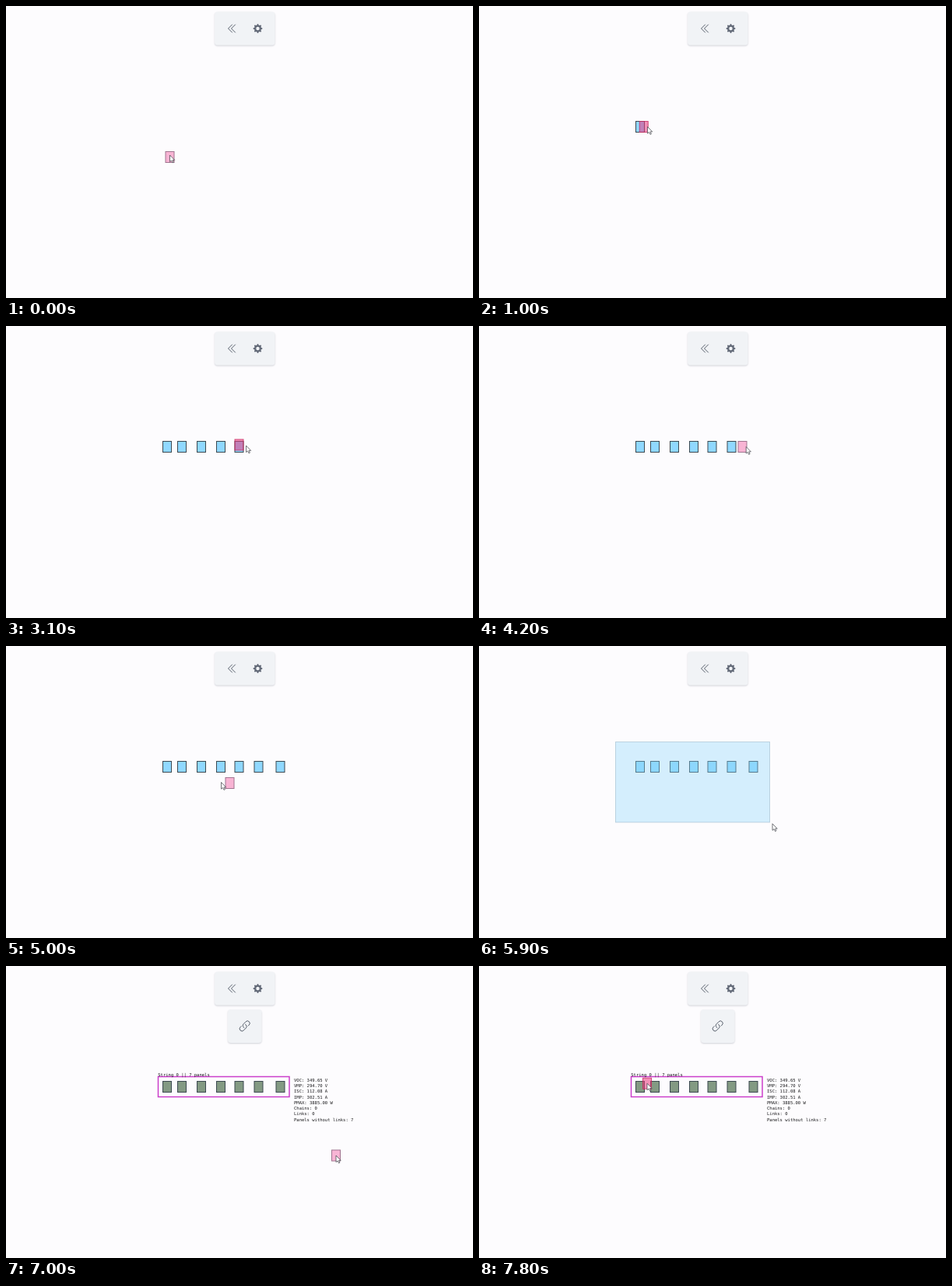
Recreate the animation shown at these times as an HTML page with a canvas. Size 600 px wide and 376 px high, loop 8 s.

```html
<!DOCTYPE html>
<html lang="en">
<head>
<meta charset="utf-8">
<title>Panel layout</title>
<style>
html, body { margin: 0; width: 100%; height: 100%; overflow: hidden; background: #fdfcfe; }
canvas { display: block; width: 600px; height: 376px; }
</style>
</head>
<body>
<canvas id="stage"></canvas>
<script>
const W = 600, H = 376, LOOP = 8000, STEP = 100;
const cv = document.getElementById('stage');
const c = cv.getContext('2d');
const dpr = window.devicePixelRatio || 1;
cv.width = W * dpr;
cv.height = H * dpr;

const ROW = 155.5, TILE_W = 11, TILE_H = 14;
const DRAG = 5500, GROUP = 6100, SELECT = 6600, RETURN = 7100;
const corner = { x: 175.5, y: 123.5 }, far = { x: 424, y: 244 }, end = { x: 216, y: 151.2 };
const stop = (t, x, y = ROW) => ({ t, x, y });

// Each panel is dropped when the pointer reaches it
const panels = [stop(800, 207), stop(1200, 226), stop(1500, 251), stop(1900, 276),
  stop(2700, 299.5), stop(3800, 324.5), stop(4400, 352.5)];

// Pointer route: the panels plus a few turning points
const route = [
  ...panels,
  stop(-STEP, 210.5, 194.5), stop(0, 210.5, 192),
  stop(2000, 279.5, 158.5),
  stop(3000, 299.5, 153), stop(3100, 308.5, 154),
  stop(4700, 438.5, 171), stop(4900, 287.5, 176.5), stop(5000, 276.5, 175.5),
  { t: 5300, ...corner }, { t: DRAG, ...corner },
  stop(5800, 373.5, 227), stop(5900, 377, 228.8),
  { t: 6000, ...far }, { t: RETURN, ...far }, { t: 7700, ...end }
].sort((a, b) => a.t - b.t);

const info = ['VOC: 349.65 V', 'VMP: 294.70 V', 'ISC: 112.08 A', 'IMP: 302.51 A',
  'PMAX: 3885.00 W', 'Chains: 0', 'Links: 0', 'Panels without links: 7'];

const chevrons = new Path2D('m18.75 4.5-7.5 7.5 7.5 7.5m-6-15L5.25 12l7.5 7.5');
const arrow = new Path2D('M0 0V8.6L2 6.9 3.5 9.9 4.9 9.2 3.5 6.4H6.2Z');
const hook = new Path2D('M13.19 8.688a4.5 4.5 0 0 1 1.242 7.244l-4.5 4.5a4.5 4.5 0 0 1-6.364-6.364l1.757-1.757');
const link = new Path2D(hook);
link.addPath(hook, new DOMMatrix([-1, 0, 0, -1, 24, 24]));

function pointAt(t) {
  const i = route.findIndex(p => p.t >= t);
  if (i < 0) return route[route.length - 1];
  const b = route[i], a = route[i - 1] || b;
  const k = a === b ? 0 : (t - a.t) / (b.t - a.t);
  return { x: a.x + (b.x - a.x) * k, y: a.y + (b.y - a.y) * k };
}

function box(x, y, w, h, fill, stroke, line = 1) {
  c.fillStyle = fill;
  c.fillRect(x, y, w, h);
  c.lineWidth = line;
  c.strokeStyle = stroke;
  c.strokeRect(x, y, w, h);
}

const tile = (p, fill, stroke) =>
  box(p.x - TILE_W / 2, p.y - TILE_H / 2, TILE_W, TILE_H, fill, stroke);

function bar(x, y, w, h) {
  c.save();
  c.shadowColor = 'rgba(40,50,70,.2)';
  c.shadowBlur = 2 * dpr;
  c.shadowOffsetY = dpr;
  c.fillStyle = '#f1f3f6';
  c.beginPath();
  c.roundRect(x, y, w, h, 4);
  c.fill();
  c.restore();
}

function icon(shape, x, y) {
  c.save();
  c.translate(x - 8, y - 8);
  c.scale(2 / 3, 2 / 3);
  c.lineWidth = 1.4;
  c.lineCap = c.lineJoin = 'round';
  c.strokeStyle = '#4b5360';
  c.stroke(shape);
  c.restore();
}

function gear(x, y) {
  c.fillStyle = '#646b79';
  c.beginPath();
  for (let i = 0; i < 64; i++) {
    const a = i * Math.PI / 32;
    const r = 5.2 + .7 * Math.max(-1, Math.min(1, 2 * Math.cos(8 * a)));
    c.lineTo(x + r * Math.cos(a), y + r * Math.sin(a));
  }
  c.closePath();
  c.moveTo(x + 2.2, y);
  c.arc(x, y, 2.2, 0, 7);
  c.fill('evenodd');
}

function ghost(g, placed) {
  const near = (w, h) => placed.some(p => Math.abs(p.x - g.x) < w && Math.abs(p.y - g.y) < h);
  if (near(.6, .6)) return;
  if (near(TILE_W, TILE_H)) tile(g, 'rgba(233,57,126,.55)', 'rgba(200,40,95,.8)');
  else tile(g, '#f8b4d4', '#a0748f');
}

function pointer(p) {
  c.save();
  c.translate(p.x, p.y);
  c.fillStyle = '#fff';
  c.strokeStyle = '#45464c';
  c.lineWidth = .75;
  c.fill(arrow);
  c.stroke(arrow);
  c.restore();
}

function details() {
  c.fillStyle = '#1c1c1e';
  c.font = '5.53px "DejaVu Sans Mono", monospace';
  c.fillText('String 0 || 7 panels', 195.3, 141.6);
  info.forEach((s, i) => c.fillText(s, 370, 148.9 + i * 7.26));
}

function draw(t) {
  const tip = pointAt(t), lag = pointAt(t - STEP);
  const placed = panels.filter(p => t > p.t);
  const picked = t >= SELECT;
  c.setTransform(dpr, 0, 0, dpr, 0, 0);
  c.fillStyle = '#fdfcfe';
  c.fillRect(0, 0, W, H);

  if (t >= GROUP) box(195.5, 142.5, 168.5, 26, 'transparent', picked ? '#cb3fca' : '#f39abd', picked ? 1.5 : 1);
  placed.forEach(p => tile(p, picked ? '#839a83' : '#90d8ff', '#3c4951'));
  if (picked) details();
  if (t > DRAG && t < GROUP) {
    box(corner.x, corner.y, lag.x - corner.x, lag.y - corner.y, 'rgba(134,212,250,.35)', 'rgba(150,180,200,.55)');
  } else {
    ghost(lag, placed);
  }

  bar(268, 7.5, 77.5, 43);
  icon(chevrons, 290, 29);
  gear(323.5, 29);
  if (picked) {
    bar(285, 56, 43.5, 43);
    icon(link, 306.7, 77.3);
  }
  pointer(tip);
}

const start = performance.now();
function tick() {
  const t = (performance.now() - start) % LOOP;
  draw(Math.floor(t / STEP) * STEP);
  requestAnimationFrame(tick);
}
tick();
</script>
</body>
</html>
```
